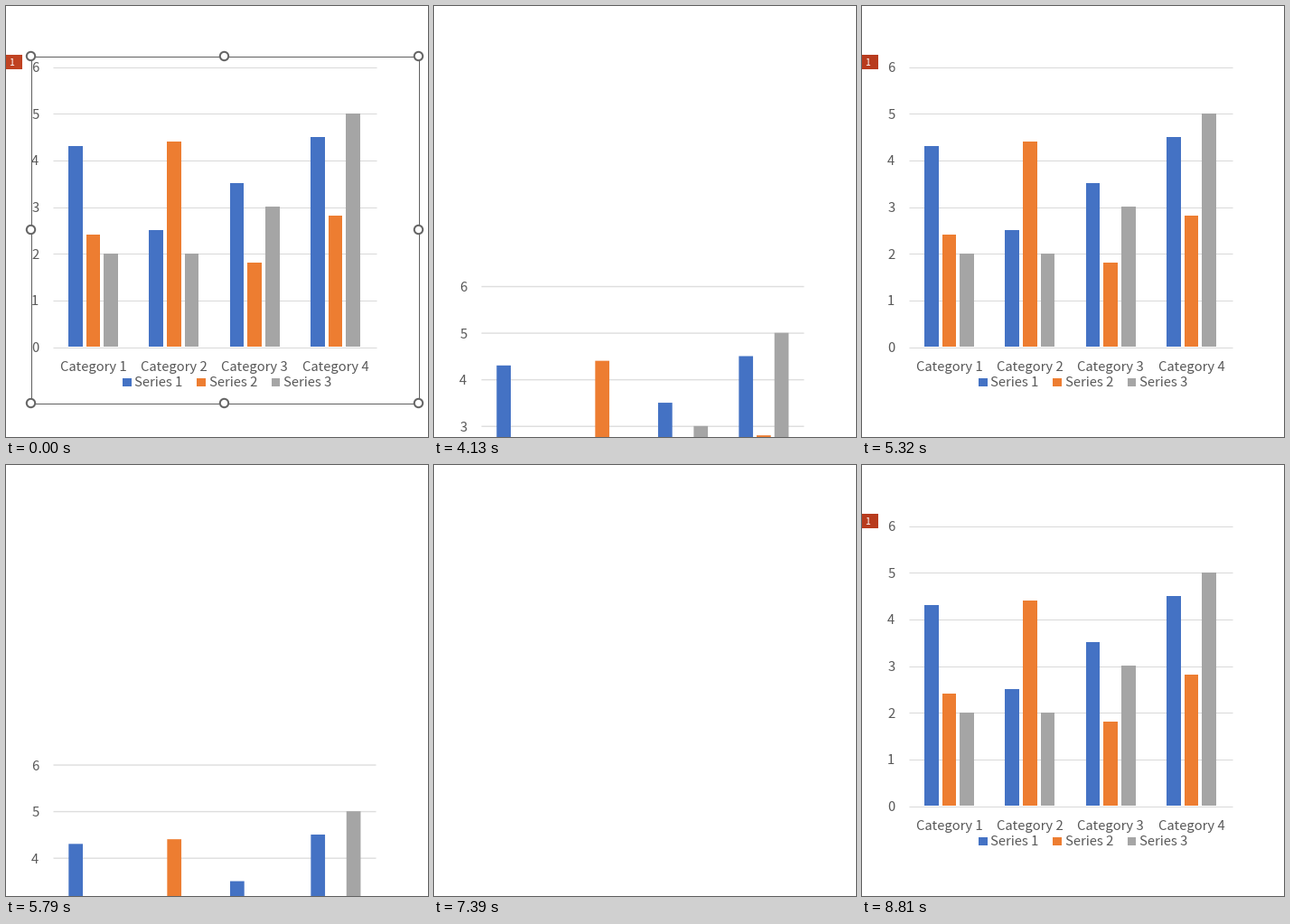
These frames come from a looping animation (467x477 px, 9.41 s). A matplotlib script:

```python
import matplotlib.pyplot as plt
from matplotlib.animation import FuncAnimation
from matplotlib.collections import LineCollection, PolyCollection
from matplotlib.patches import Circle, Rectangle
from matplotlib.transforms import Affine2D

W, H, DPI = 467, 477, 64
LOOP, TICK = 9410, 12
PT = 72 / DPI  # points per pixel

COLORS = ["#4472C4", "#ED7D31", "#A5A5A5"]
VALUES = [(4.3, 2.4, 2), (2.5, 4.4, 2), (3.5, 1.8, 3), (4.5, 2.8, 5)]
TEXT = "#595959"

# Slide shows: start, end, landing time, times at which the picture steps
SHOWS = [
    (3990, 5320, 4378, [4130, 4190, 4250, 4320, 4380]),
    (5530, 6920, 6060, [5650, 5720, 5790, 5860, 5930, 6000, 6060]),
    (7390, 8810, 7898, [7590, 7660, 7720, 7790, 7870, 7920]),
]
SPEED = 0.978  # pixels per ms
BLACKOUT = (3910, 3990)

plt.rcParams["font.family"] = ["Noto Sans CJK JP", "DejaVu Sans"]

fig = plt.figure(figsize=(W / DPI, H / DPI), dpi=DPI, facecolor="white")
ax = fig.add_axes([0, 0, 1, 1])
ax.set_xlim(0, W)
ax.set_ylim(H, 0)
ax.axis("off")


def box(x, y, w, h):
    return [(x, y), (x + w, y), (x + w, y + h), (x, y + h)]


def label(x, y, s, trans, ha="center", size=14.8, color=TEXT):
    return ax.text(x, y, s, ha=ha, va="baseline", fontsize=size * PT,
                   color=color, transform=trans, zorder=4)


def chart(trans, x0, x1, top, base, dx, dy, line_color, line_width, snap):
    """Build the clustered column chart and return its artists."""
    unit = (base - top) / 6
    rows = [base - unit * v for v in range(7)]
    grid = LineCollection([[(x0, y), (x1, y)] for y in rows],
                          colors=line_color, linewidths=line_width * PT,
                          transform=trans, zorder=1)
    floor = round(base - 0.2)
    bars, fills = [], []
    for i, group in enumerate(VALUES):
        for j, v in enumerate(group):
            x = 69 + dx + 89.35 * i + 19.7 * j
            bars.append(box(x, floor - unit * v, 15.7, unit * v))
            fills.append(COLORS[j])
    for j, color in enumerate(COLORS):
        bars.append(box(129 + dx + 82.4 * j, 411.7 + dy, 9.5, 9.5))
        fills.append(color)
    columns = PolyCollection(bars, facecolors=fills, edgecolors="none",
                             transform=trans, zorder=2)
    for part in (grid, columns):
        part.set_snap(snap)
        ax.add_collection(part, autolim=False)

    parts = [grid, columns]
    parts += [label(32.3, y + 5.5, str(v), trans) for v, y in enumerate(rows)]
    for i in range(4):
        parts.append(label(96.7 + 89.3 * i, 404, f"Category {i + 1}", trans))
    for j in range(3):
        parts.append(label(142.4 + 82.3 * j, 421 + dy, f"Series {j + 1}",
                           trans, ha="left"))
    return parts


def selection():
    """Frame with eight round handles."""
    left, mid, right = 27.5, 241.5, 456.5
    top, middle, bottom = 55.5, 247.5, 439.5
    parts = [Rectangle((left, top), right - left, bottom - top, fill=False,
                       edgecolor="#606060", linewidth=PT, snap=True, zorder=5)]
    for x in (left, mid, right):
        for y in (top, middle, bottom):
            if (x, y) != (mid, middle):
                parts.append(Circle((x, y), 4.7, facecolor="white",
                                    edgecolor="#646464", linewidth=2 * PT,
                                    zorder=6))
    for part in parts:
        ax.add_patch(part)
    return parts


shift = Affine2D()
slide = chart(shift + ax.transData, 52.5, 409.5, 68, 377.4, 0.3, 0.5,
              "#DEDEDE", 1.4, False)
editor = chart(ax.transData, 52, 410, 67.5, 377.5, 0, 0,
               "#D9D9D9", 1, True)

tag = Rectangle((0, 54), 18, 16, linewidth=0, snap=True, zorder=3)
ax.add_patch(tag)
editor += [tag, label(6, 66.3, "1", ax.transData, size=10.5, color="white")]

handles = selection()

dark = Rectangle((0, 0), W, H, facecolor="#262626", linewidth=0, zorder=9)
edge = Rectangle((0, H - 1), W, 1, facecolor="#0C0C0C", linewidth=0, zorder=10)
ax.add_patch(dark)
ax.add_patch(edge)


def show(parts, on):
    for part in parts:
        part.set_visible(on)


def slide_offset(t):
    """Distance of the flying chart below its place; None outside a show."""
    for start, end, landing, steps in SHOWS:
        if start <= t < end:
            done = [s for s in steps if s <= t]
            return max(0, SPEED * (landing - done[-1])) if done else H
    return None


def update(frame):
    t = (frame + 1) * TICK - 1  # changes within a tick show at its start
    black = BLACKOUT[0] <= t < BLACKOUT[1]
    offset = slide_offset(t)
    selected = t < BLACKOUT[0]
    show([dark, edge], black)
    show(handles, selected)
    show(editor, offset is None and not black)
    show(slide, offset is not None and offset < H)
    tag.set_facecolor("#C04221" if selected else "#B83B1D")
    shift.clear().translate(0, offset or 0)
    return []


anim = FuncAnimation(fig, update, frames=LOOP // TICK, interval=TICK,
                     init_func=lambda: update(0), repeat=True, repeat_delay=0,
                     blit=False, cache_frame_data=False)
plt.show()
```
